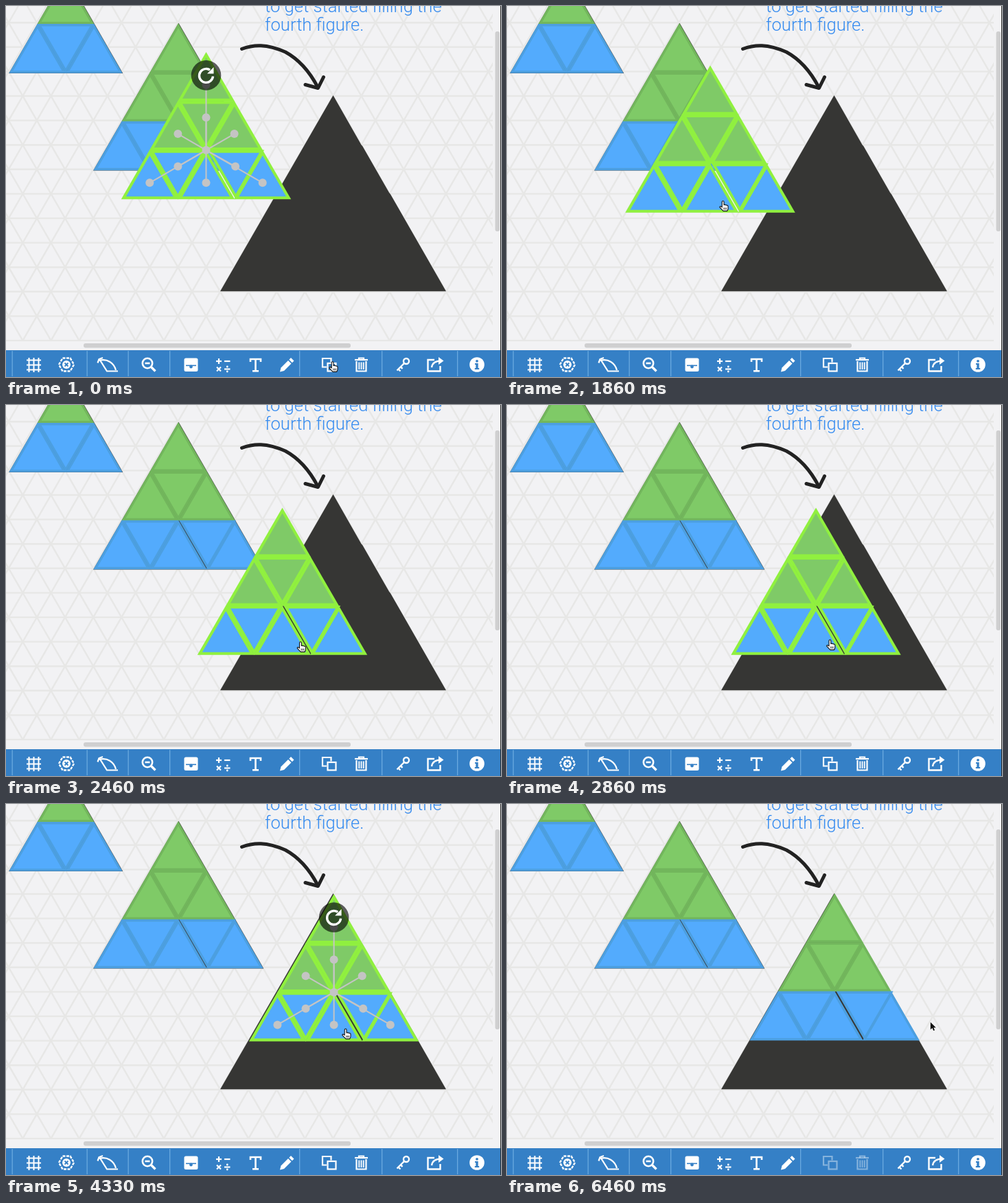
Write an HTML page with a canvas that moves like this. It is 721 px wide and 540 px high and loops after 7.53 s.

```html
<!DOCTYPE html>
<html lang="en">
<head>
<meta charset="utf-8">
<style>
html, body { margin: 0; width: 100%; height: 100%; overflow: hidden; background: #f2f2f4; }
canvas { display: block; }
</style>
</head>
<body>
<canvas id="stage" width="721" height="540"></canvas>
<script>
const ctx = document.getElementById('stage').getContext('2d');
const LOOP = 7530, STEP = 200 / 3;
const SIDE = 82.2, H = 71.2;
const DARK = '#363634', BAR = '#3580c6', LIME = '#90f03f';
const GREEN = { fill: '#7fca67', edge: '#72b65c' };
const BLUE = { fill: '#53abfd', edge: '#4c9fe0' };

// Keys are [step, x, y].
const POINTER = [[0, 470, 517], [12, 319, 288], [18, 305, 263], [20, 305, 263], [21, 302, 260]];
const DRAG = [[24, 0, 0], [28, 4.5, 19.5], [29, 7, 23], [32, 35, 50], [36, 89, 77], [37, 111, 82.5],
  [40, 142, 87], [43, 158.5, 82.5], [48, 180, 75], [50, 184, 73], [53, 184, 73],
  [56, 184, 69], [59, 187, 66.5]];
const SNAP = [[63, 187, 66.5], [66, 185.7, 63]];
const LEAVE = [[68, 489, 326.5], [76, 615.5, 317.5], [77, 615.5, 317.5], [78, 616.8, 317.5]];
const smooth = u => u * u * (3 - 2 * u);

function along(keys, k, ease = u => u) {
  if (k <= keys[0][0]) return keys[0].slice(1);
  for (let i = 1; i < keys.length; i++) {
    const [a, ax, ay] = keys[i - 1], [b, bx, by] = keys[i];
    if (k <= b) {
      const u = ease((k - a) / (b - a));
      return [ax + (bx - ax) * u, ay + (by - ay) * u];
    }
  }
  return keys[keys.length - 1].slice(1);
}

function poly(points, close = true) {
  ctx.beginPath();
  points.forEach(([x, y]) => ctx.lineTo(x, y));
  if (close) ctx.closePath();
}
function fillPoly(points, color) {
  poly(points);
  ctx.fillStyle = color;
  ctx.fill();
}
function line(...xy) {
  ctx.beginPath();
  for (let i = 0; i < xy.length; i += 2) ctx.lineTo(xy[i], xy[i + 1]);
  ctx.stroke();
}
function disc(x, y, r, color) {
  ctx.beginPath();
  ctx.arc(x, y, r, 0, 7);
  ctx.fillStyle = color;
  ctx.fill();
}
function ring(x, y, r, from = 0, to = 2 * Math.PI) {
  ctx.beginPath();
  ctx.arc(x, y, r, from, to);
  ctx.stroke();
}
function bar(x, y, w, h, r, color) {
  ctx.beginPath();
  ctx.roundRect(x, y, w, h, r);
  ctx.fillStyle = color;
  ctx.fill();
}

function triangle(x, y, dir, inset) {
  const s = 1 - inset / (H / 3);
  const dx = SIDE / 2 * s, dy = H / 3 * s * dir;
  return [[x, y - 2 * dy], [x + dx, y + dy], [x - dx, y + dy]];
}

// Centres of the small triangles below an apex; the loose one leaves a gap.
function pieces(x, y, rows, gap) {
  const list = [];
  for (let r = 0; r < rows; r++) {
    for (let i = 0; i <= 2 * r; i++) {
      const up = i % 2 === 0;
      list.push({
        x: x + (i - r) * SIDE / 2 + (r === 2 && i === 3 ? gap : 0),
        y: y + r * H + (up ? 2 : 1) * H / 3,
        dir: up ? 1 : -1,
        paint: r === rows - 1 ? BLUE : GREEN
      });
    }
  }
  return list;
}

function figure(x, y, rows, gap, selected) {
  const w = selected ? 4.1 : 3.5;
  ctx.lineJoin = 'miter';
  ctx.lineWidth = w;
  for (const p of pieces(x, y, rows, gap)) {
    fillPoly(triangle(p.x, p.y, p.dir, w / 2 - 0.25), p.paint.fill);
    ctx.strokeStyle = selected ? LIME : p.paint.edge;
    ctx.stroke();
  }
}

function backing(x, y, rows) {
  const dx = rows * SIDE / 2 + 0.6;
  fillPoly([[x + 0.4, y - 0.8], [x + dx + 0.4, y + rows * H + 0.5], [x - dx, y + rows * H + 0.5]], DARK);
}

function handles(x, y, gap) {
  const cy = y + 2 * H, grey = '#c4c4c4';
  ctx.strokeStyle = grey;
  ctx.lineWidth = 2;
  for (const p of pieces(x, y, 3, gap)) {
    line(x, cy, p.x, p.y);
    disc(p.x, p.y, 6, grey);
  }
  disc(x, cy, 6, grey);

  ctx.save();
  ctx.translate(x, y + 33.5);
  disc(0, 0, 21.8, 'rgba(0,0,0,.62)');
  ctx.strokeStyle = '#fff';
  ctx.lineWidth = 3.4;
  ring(0, 0.5, 10, 0.1, 5.3);
  fillPoly([[11, -12], [11, -2.5], [1.5, -2.5]], '#fff');
  ctx.restore();
}

function background() {
  ctx.fillStyle = '#f2f2f4';
  ctx.fillRect(0, 0, 721, 540);
  ctx.save();
  ctx.beginPath();
  ctx.rect(0, 0, 709, 488);
  ctx.clip();
  ctx.strokeStyle = '#e7e7e6';
  ctx.lineWidth = 2.4;
  for (let k = -4; k <= 10; k++) line(0, 131 + k * H / 2, 709, 131 + k * H / 2);
  const run = 500 / Math.sqrt(3);
  for (let k = -20; k <= 20; k++) {
    const x = 476.5 + k * SIDE / 2, back = 131 / Math.sqrt(3);
    line(x - back, 0, x - back + run, 500);
    line(x + back, 0, x + back - run, 500);
  }
  ctx.restore();
  bar(712.5, 37, 6.5, 291, 3, '#cfcfd0');
  bar(113, 491, 389, 6.5, 3, '#cfcfd0');
}

function note() {
  ctx.fillStyle = '#358bf0';
  ctx.font = '300 25.6px Roboto, sans-serif';
  ctx.fillText('to get started filling the', 377, 8.5);
  ctx.fillText('fourth figure.', 377, 35.5);

  ctx.strokeStyle = '#222';
  ctx.lineCap = ctx.lineJoin = 'round';
  ctx.lineWidth = 5;
  ctx.stroke(new Path2D('M343.5 62.5C361 56 379 55 407 67C429 79 444 99 454 118'));
  ctx.stroke(new Path2D('M436 114.5L454.5 119.5L462.5 103.5'));
  ctx.lineCap = 'butt';
}

function symbols() {
  ctx.lineWidth = 2;
  for (const d of [-7, 0, 7]) {
    line(40.5 + d, 512, 40.5 + d, 533);
    line(30, 522.5 + d, 51, 522.5 + d);
  }

  const hex = [0, 1, 2, 3, 4, 5].map(i => [88 + 11 * Math.cos(i * Math.PI / 3), 522 + 11 * Math.sin(i * Math.PI / 3)]);
  poly(hex);
  ctx.lineWidth = 2.4;
  ctx.setLineDash([4, 1.5]);
  ctx.stroke();
  ctx.setLineDash([]);
  disc(88, 522, 6, '#fff');
  ctx.strokeStyle = BAR;
  ctx.lineWidth = 1.8;
  line(85.5, 519.5, 90.5, 524.5);
  line(90.5, 519.5, 85.5, 524.5);

  ctx.strokeStyle = '#fff';
  ctx.lineWidth = 2.2;
  line(136, 514, 147, 531.5, 163, 531.5);
  ctx.stroke(new Path2D('M136 516C147 513 157 519 160 530'));
  line(133.5, 519.5, 135.5, 514, 141, 512);

  ctx.lineWidth = 2.6;
  ring(206, 520, 7.2);
  line(202.5, 520, 209.5, 520);
  ctx.lineWidth = 3.4;
  line(211, 525, 217.5, 531.5);

  bar(259.5, 512.5, 20, 19.5, 2.5, '#fff');
  bar(262, 522.5, 15, 1.6, 0, BAR);
  disc(269.5, 525, 2.4, BAR);

  ctx.lineWidth = 2.2;
  line(306, 517, 314, 517);
  line(310, 513, 310, 521);
  line(318, 517, 326.5, 517);
  line(307, 525.5, 313, 531.5);
  line(313, 525.5, 307, 531.5);
  line(318, 528.5, 326.5, 528.5);
  disc(322.3, 525, 1.4, '#fff');
  disc(322.3, 532, 1.4, '#fff');

  ctx.lineWidth = 2.6;
  line(356, 518, 356, 514, 371, 514, 371, 518);
  line(363.5, 514, 363.5, 531);
  line(359, 531.3, 368, 531.3);

  fillPoly([[399, 532.5], [400.5, 526.5], [411, 516], [415.5, 520.5], [405, 531]], '#fff');
  fillPoly([[412.3, 514.7], [415, 512], [419.5, 516.5], [416.8, 519.2]], '#fff');
}

function editSymbols(alpha) {
  ctx.save();
  ctx.globalAlpha = alpha;
  ctx.strokeStyle = '#fff';
  ctx.lineWidth = 2.2;
  line(467, 525.5, 461, 525.5, 461, 513, 473.5, 513, 473.5, 518.5);
  ctx.strokeRect(468.5, 520, 12, 11.5);
  line(508, 515, 527, 515);
  line(514, 515, 514, 512.5, 521, 512.5, 521, 515);
  line(510.5, 517, 510.5, 531.5, 524.5, 531.5, 524.5, 517);
  ctx.lineWidth = 1.8;
  for (const x of [514.3, 517.5, 520.7]) line(x, 518.5, x, 529);
  ctx.restore();
}

function tailSymbols() {
  ctx.strokeStyle = '#fff';
  ctx.lineWidth = 2.4;
  ring(583, 517, 4);
  line(580, 520, 569.5, 530.5);
  line(571, 528, 574.5, 531.5);
  line(574.5, 524.8, 577.5, 527.8);

  line(624, 515, 614.5, 515, 614.5, 531.5, 632.5, 531.5, 632.5, 524);
  ctx.stroke(new Path2D('M620 526C621 519 626 516.5 634 516.5'));
  fillPoly([[630, 511], [637.5, 516.5], [630, 522]], '#fff');

  disc(686, 522, 10.8, '#fff');
  disc(686, 516.8, 1.9, BAR);
  fillPoly([[683, 520], [687.7, 520], [687.7, 527], [689.2, 527], [689.2, 529], [682.8, 529],
    [682.8, 527], [684.3, 527], [684.3, 522], [683, 522]], BAR);
}

function toolbar(editAlpha) {
  bar(0, 501, 721, 39, 0, BAR);
  for (const x of [9, 118, 178, 238.5, 427.5, 547.5, 657.5]) bar(x - 0.5, 502, 1.3, 37, 0, '#6aa9df');
  ctx.strokeStyle = '#fff';
  ctx.lineJoin = 'miter';
  symbols();
  editSymbols(editAlpha);
  tailSymbols();
  bar(720, 0, 1, 540, 0, '#2b2b2b');
}

const HAND = new Path2D('M4.2 10V2.2a1.4 1.4 0 0 1 2.8 0V6.4q1.4-.8 2.2.3 1.3-.6 2 .5 1.8-.3 1.8 1.4v3q0 2-1.4 3.8H6L1.2 10.4q-.8-1.4.6-1.8 1-.2 2.4 1.4z');
const ARROW = new Path2D('M0 0V11L2.6 8.6 4.4 12.6 6.3 11.8 4.5 8H8Z');

function cursor(x, y, hand) {
  ctx.save();
  ctx.translate(x, y);
  ctx.lineWidth = 1.1;
  ctx.lineJoin = 'round';
  ctx.fillStyle = hand ? '#fff' : '#111';
  ctx.strokeStyle = hand ? '#111' : '#fff';
  const shape = hand ? HAND : ARROW;
  if (hand) {
    ctx.fill(shape);
    ctx.stroke(shape);
    ctx.lineWidth = 0.8;
    for (const cx of [6.8, 8.6, 10.4]) line(cx, 10.5, cx, 13.5);
  } else {
    ctx.stroke(shape);
    ctx.fill(shape);
  }
  ctx.restore();
}

function pointerAt(k) {
  if (k < 24) return along(POINTER, k, k < 12 ? smooth : undefined);
  if (k > 68) return along(LEAVE, k, k < 76 ? smooth : undefined);
  const [dx, dy] = along(DRAG, k === 24 ? k : k + 1);
  return [302 + dx, 260 + dy];
}

function draw(time) {
  const k = Math.floor((time % LOOP + 6.7) / STEP);
  const [dx, dy] = along(k < 63 ? DRAG : SNAP, k);
  const x = 291.5 + dx, y = 67.4 + dy;
  const selected = k < 96;
  const gap = k < 63 ? 2.1 : 2.8;

  background();
  note();
  backing(87, -45, 2);
  figure(87, -45, 2, 0, false);
  backing(251, 25.5, 3);
  figure(251, 25.5, 3, 1.5, false);
  fillPoly([[476.5, 130], [517.5, 202], [519.3, 204], [558, 271.5], [560, 274], [641, 415.3], [312, 415.3]], DARK);
  figure(x, y, 3, gap, selected);
  if (k <= 24 || (k >= 65 && selected)) handles(x, y, 1.5);
  toolbar(k < 96 ? 1 : k < 97 ? 0.7 : 0.4);

  const [cx, cy] = pointerAt(k);
  const idle = k < 24 ? cy > 281 && cy < 500 : cx > 592;
  cursor(cx, cy, !idle);
}

const start = performance.now();
function tick() {
  draw(performance.now() - start);
  requestAnimationFrame(tick);
}
tick();
</script>
</body>
</html>
```
